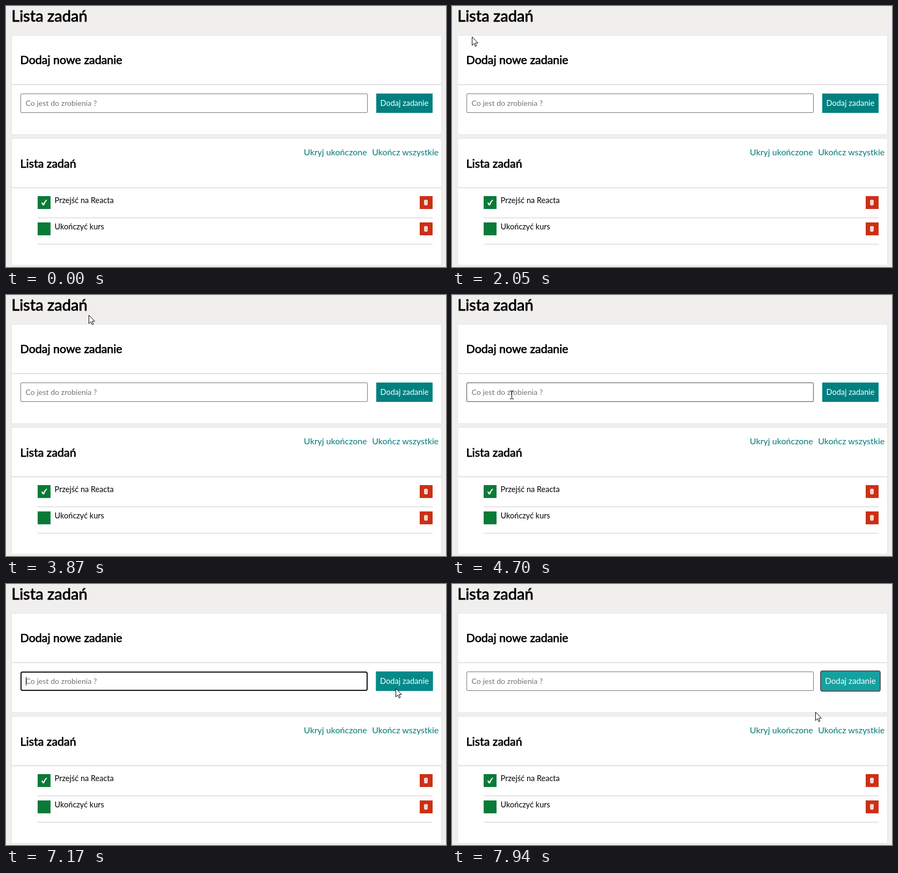
An HTML page that plays this animation: 820x486 px, repeating every 8 s.

```html
<!DOCTYPE html>
<html lang="pl">
<head>
<meta charset="utf-8">
<title>Lista zadań</title>
<style>
  html, body { margin: 0; width: 100%; height: 100%; overflow: hidden; background: #f1efee; }
  svg { display: block; width: 820px; height: 486px; font: 14.5px Lato, sans-serif; }
  .panel { fill: #fff; stroke: #e6e4e3; }
  .rule { fill: #ccc; }
  .h1, .h2 { stroke: #000; stroke-linejoin: round; }
  .h1 { font-size: 29.1px; stroke-width: .95px; }
  .h2 { font-size: 21.4px; stroke-width: .75px; }
  .link { font-size: 16.05px; fill: #007a7a; }
  .hint { font-size: 14.2px; fill: #757575; }
</style>
</head>
<body>
<svg viewBox="0 0 820 486">
  <defs>
    <g id="bin">
      <rect width="24" height="24" fill="#cb3016"/>
      <path d="M8 8Q11.5 5.6 15 8L14.5 16.6Q11.5 18 8.5 16.6Z" fill="#fff"/>
      <path d="M8.5 9h6M10.3 10.2v6M12.7 10.2v6" stroke="#cb3016" stroke-width=".7" opacity=".7"/>
    </g>
  </defs>
  <rect width="820" height="486" fill="#f1efee"/>
  <text class="h1" x="10.2" y="29">Lista zadań</text>

  <rect class="panel" x="10.5" y="54.5" width="801" height="185"/>
  <text class="h2" x="26.6" y="108">Dodaj nowe zadanie</text>
  <rect class="rule" x="11" y="146" width="800" height="1"/>
  <rect id="field" fill="#fff"/>
  <text class="hint" x="36.4" y="186">Co jest do zrobienia ?</text>
  <rect id="caret" x="37" y="173" width="1" height="16"/>
  <g id="button">
    <rect id="face" x="690" y="163" width="105" height="36"/>
    <rect id="ring" x="689.7" y="163" width="105.6" height="35.5" rx="3" fill="none" stroke="#555d62" stroke-width="2"/>
    <text x="742.5" y="186" text-anchor="middle" fill="#fff">Dodaj zadanie</text>
  </g>

  <rect class="panel" x="10.5" y="246.5" width="801" height="236"/>
  <text class="h2" x="26.6" y="301">Lista zadań</text>
  <text class="link" x="555" y="278">Ukryj ukończone</text>
  <text class="link" x="682.2" y="278">Ukończ wszystkie</text>
  <rect class="rule" x="11" y="338" width="800" height="1"/>

  <rect x="59" y="354" width="24" height="24" fill="#0a7a37"/>
  <path d="M65.8 366.8L68 365.8L69.5 368.6Q71.7 363.4 75.3 360.6L76.6 361.2Q72.9 365.4 70.9 371.2H68.6Z" fill="#fff"/>
  <text x="90.6" y="367">Przejść na Reacta</text>
  <use href="#bin" x="771" y="354"/>
  <rect class="rule" x="59" y="394" width="736" height="1"/>
  <rect x="59" y="403" width="24" height="24" fill="#0a7a37"/>
  <text x="90.6" y="416">Ukończyć kurs</text>
  <use href="#bin" x="771" y="403"/>
  <rect class="rule" x="59" y="443" width="736" height="1"/>

  <g id="cursor">
    <path id="arrow" d="M.5 .5V16.2L4.1 12.8L6.5 18.3L8.8 17.3L6.5 11.9H11.4Z" fill="#fff" stroke="#000"/>
    <path id="beam" d="M-3-8h3v1h1v-1h3v1h-3v14h3v1h-3v-1h-1v1h-3v-1h3v-14h-3z"/>
  </g>
</svg>
<script>
const LOOP = 8000, ENTER = 820, FOCUS = 4850, HOVER = 7000, CLICK = 7400;
const el = id => document.getElementById(id);

// The pointer glides between stops; "rest" is how long it waits there
const stops = [
  { at: ENTER, x: 599, y: 443 },
  { at: 1050, x: 314, y: 221, rest: 240 },
  { at: 1430, x: 242, y: 172 },
  { at: 2140, x: 8, y: 40 },
  { at: 2360, x: 8, y: 36 },
  { at: 2860, x: 74, y: 33 },
  { at: 3390, x: 154, y: 37, rest: 790 },
  { at: 4700, x: 111, y: 186, rest: 620 },
  { at: 5610, x: 124, y: 200 },
  { at: 5840, x: 140, y: 186, rest: 480 },
  { at: 6540, x: 290, y: 104 },
  { at: 6840, x: 670, y: 172 },
  { at: 7170, x: 726, y: 194, rest: 620 },
  { at: 7940, x: 677, y: 238 }
];

const input = [27, 163, 674, 199];
const textAreas = [input, [11, 0, 151, 46], [27, 88, 217, 114]];

const inside = ([x, y], [l, t, r, b]) => x >= l && x <= r && y >= t && y <= b;
const clamp = p => Math.max(0, Math.min(1, p));
const mix = (a, b, p) => a + (b - a) * p;
const show = (id, on) => el(id).setAttribute('visibility', on ? 'visible' : 'hidden');
function set(id, attrs) {
  for (const key in attrs) el(id).setAttribute(key, attrs[key]);
}

function pointer(t) {
  const next = stops.findIndex(s => s.at > t);
  const b = stops.at(next), a = stops[Math.max(0, stops.indexOf(b) - 1)];
  const leave = a.at + (a.rest || 0);
  const p = clamp((t - leave) / (b.at - leave));
  return [Math.round(mix(a.x, b.x, p)), Math.round(mix(a.y, b.y, p))];
}

function drawField(focused, hovered) {
  const w = focused ? 2 : 1;
  set('field', {
    x: 27 + w / 2, y: 163 + w / 2, width: 647 - w, height: 36 - w, rx: w + .5,
    stroke: focused ? '#101010' : hovered ? '#4b4b4b' : '#767676', 'stroke-width': w
  });
}

function drawButton(t) {
  const p = Math.sin(clamp((t - HOVER) / 1000) * Math.PI / 2);
  const s = 1 + .05 * p, tone = mix(128, 161, p);
  set('button', { transform: `translate(742.5 181) scale(${s}) translate(-742.5 -181)` });
  set('face', { fill: `rgb(${mix(0, 22, p)},${tone},${tone})` });
  show('ring', t >= CLICK);
}

function draw(t) {
  const pos = pointer(t), visible = t >= ENTER;
  const beam = textAreas.some(area => inside(pos, area));
  const focused = t >= FOCUS && t < CLICK;
  set('cursor', { transform: `translate(${pos})` });
  show('arrow', visible && !beam);
  show('beam', visible && beam);
  drawField(focused, visible && inside(pos, input));
  show('caret', focused && (t < 5000 || t % 1000 < 500));
  drawButton(t);
}

const begin = performance.now();
function tick() {
  draw((performance.now() - begin) % LOOP);
  requestAnimationFrame(tick);
}
tick();
</script>
</body>
</html>
```
